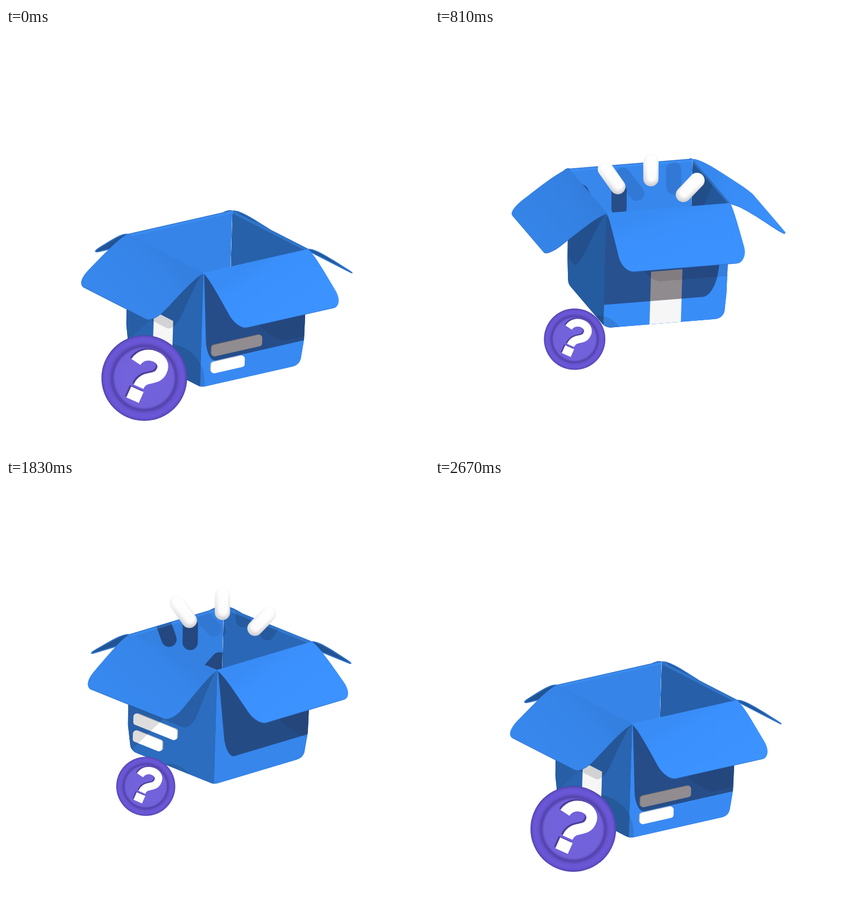
Recreate the animation shown at these times as an HTML page with a canvas. Size 748 by 748 pixels, loop 2700 ms.

```html
<!DOCTYPE html>
<html lang="en">
<head>
<meta charset="utf-8">
<title>Mystery box</title>
<style>
html, body { margin: 0; width: 100%; height: 100%; overflow: hidden; background: #fff; }
canvas { display: block; width: 748px; height: 748px; }
</style>
</head>
<body>
<canvas id="stage" width="748" height="748"></canvas>
<script>
const ctx = document.getElementById('stage').getContext('2d');
const LOOP = 2700, STEP = 30;
const HALF = 114.5, DEPTH = 222, FLAP_HALF = 113, WALL = 8;
const PITCH = 0.35, RISE = 0.937, ROLL = 0.03;
const DEG = Math.PI / 180;
const KEY = { az: 30 * DEG, slope: 0.85, power: 0.45 };
const FILL = { az: -18 * DEG, slope: 0.46, power: 0.13 };

// Monotone cubic through [time, value] pairs, at rest at both ends
function track(keys) {
  const d = keys.slice(1).map((k, i) => (k[1] - keys[i][1]) / (k[0] - keys[i][0]));
  const slope = keys.map((_, i) => {
    const a = d[i - 1], b = d[i];
    return i && i < d.length && a * b > 0 ? 2 * a * b / (a + b) : 0;
  });
  return t => {
    let i = 0;
    while (i < keys.length - 2 && t > keys[i + 1][0]) i++;
    const [t0, a] = keys[i], [t1, b] = keys[i + 1], h = t1 - t0, u = (t - t0) / h, v = 1 - u;
    return a * v * v * (1 + 2 * u) + b * u * u * (3 - 2 * u)
      + h * u * v * (slope[i] * v - slope[i + 1] * u);
  };
}
const spin = track([[0, 0], [570, 32.8], [1080, 129], [1500, 211], [1830, 277], [2070, 316], [2700, 360]]);
const boxY = track([[0, 378.5], [570, 293], [1080, 272], [1300, 270], [1500, 272], [1830, 282],
  [2070, 296], [2175, 334], [2700, 378.5]]);
const capsuleY = track([[0, 450], [570, 290], [1080, 172], [1300, 165], [1500, 166], [1650, 172],
  [1830, 192], [2070, 256], [2190, 300], [2700, 450]]);

let cx, cy;
const project = (x, z, y) => {
  const v = PITCH * z + RISE * y;
  return [cx + x - ROLL * v, cy + v + ROLL * x];
};
// Point on a side: w along it, o out of it, y down from the rim
const onSide = (az, w, o, y) => {
  const s = Math.sin(az), c = Math.cos(az), r = HALF + o;
  return project(c * w + s * r, -s * w + c * r, y);
};

function trace(points) {
  ctx.beginPath();
  points.forEach(p => ctx.lineTo(p[0], p[1]));
  ctx.closePath();
}
function fill(points, style) {
  trace(points);
  ctx.fillStyle = style;
  ctx.fill();
}
const blue = k => `rgb(${58 * k},${143 * k},${Math.min(255, 251 * k)})`;
const shade = a => `rgba(18,8,14,${a})`;
const facing = (az, light) => Math.max(0, Math.cos(az - light.az));
const wallTone = az => 0.44 + KEY.power * facing(az, KEY) + FILL.power * facing(az, FILL)
  + 0.12 * Math.max(0, Math.cos(az + 80 * DEG));
const flapTone = az => 0.95 + 0.07 * Math.cos(az - 50 * DEG);

const bend = s => {
  const r = 1 - s, a = 3 * r * r * s, b = 3 * r * s * s, c = s * s * s;
  return [20 * a + 60 * b + 108 * c, 3 * a + 36 * b + 70 * c];
};
const flapOutline = (() => {
  const half = [];
  for (let i = 0; i <= 12; i++) half.push([-FLAP_HALF, i / 12 * 0.82]);
  for (let i = 1; i <= 8; i++) {
    const a = i / 8 * Math.PI / 2;
    half.push([-FLAP_HALF + 20 * (1 - Math.cos(a)), 0.82 + 0.18 * Math.sin(a)]);
  }
  const all = half.concat(half.slice().reverse().map(([w, s]) => [-w, s]));
  return all.map(([w, s]) => [w * (1 + 0.02 * s), ...bend(s)]);
})();

function drawFlap(az) {
  const pts = flapOutline.map(([w, o, y]) => onSide(az, w, o, y));
  ctx.lineWidth = 2;
  ctx.lineJoin = 'round';
  if (Math.cos(az) < -0.566) {
    fill(pts, blue(0.58));
    ctx.strokeStyle = blue(0.8);
    ctx.stroke();
    return;
  }
  const k = flapTone(az);
  fill(pts.map(([x, y]) => [x, y + 2]), blue(k * 0.8));
  const a = onSide(az, 0, 0, 0), b = onSide(az, 0, 108, 70);
  const g = ctx.createLinearGradient(a[0], a[1], b[0], b[1]);
  g.addColorStop(0, blue(k * 0.96));
  g.addColorStop(0.25, blue(k * 0.99));
  g.addColorStop(1, blue(k * 1.01));
  fill(pts, g);
  ctx.strokeStyle = g;
  ctx.stroke();
}

const rect = (az, w0, w1, y0, y1, o = 0) =>
  [[w0, y0], [w1, y0], [w1, y1], [w0, y1]].map(([w, y]) => onSide(az, w, o, y));

function bar(az, w0, w1, y) {
  const r = 5.5;
  [[0, '#bdbdc2'], [2.5, '#fff']].forEach(([o, color]) => {
    fill(rect(az, w0 + r, w1 - r, y + r, y + 21 - r, o), color);
    ctx.strokeStyle = color;
    ctx.lineWidth = 2 * r;
    ctx.lineJoin = 'round';
    ctx.stroke();
  });
}

function drawWall(az, index) {
  const k = wallTone(az);
  ctx.save();
  trace(rect(az, -HALF, HALF, 0, DEPTH + 12));
  ctx.clip();
  ctx.fillStyle = blue(k);
  ctx.fill();
  if (index === 0) fill(rect(az, -29, 29, 117, DEPTH + 4), '#f6f6f7');
  if (index === 1) {
    bar(az, -92, 16, 140);
    bar(az, -92, -21, 172);
  }
  [KEY, FILL].forEach(light => {
    const delta = az - light.az, c = Math.cos(delta);
    if (c < 0.08) return;
    // The walls lie slightly inside the rim, so rays travel a little further
    const cast = flapOutline.map(([w, o, y]) =>
      onSide(az, w + 1.09 * o * Math.tan(delta), 0, y + light.slope * 1.09 * o / c));
    fill(cast, shade(light.power * c / k));
  });
  ctx.restore();
}

function hull(points) {
  const sorted = points.slice().sort((a, b) => a[0] - b[0] || a[1] - b[1]);
  const half = list => {
    const out = [];
    for (const p of list) {
      while (out.length > 1) {
        const [a, b] = out.slice(-2);
        if ((b[0] - a[0]) * (p[1] - a[1]) - (b[1] - a[1]) * (p[0] - a[0]) > 0) break;
        out.pop();
      }
      out.push(p);
    }
    return out.slice(0, -1);
  };
  return half(sorted).concat(half(sorted.reverse()));
}
function bodyOutline(sides) {
  const pts = [], r = 18;
  sides.forEach(az => {
    pts.push(onSide(az, HALF, 0, 0), onSide(az, HALF - 2, -2, 170));
    const [x, y] = onSide(az, HALF - r, -r, DEPTH - r);
    for (let i = 0; i < 24; i++) {
      const a = i * 15 * DEG;
      pts.push([x + r * Math.cos(a), y + r * Math.sin(a)]);
    }
  });
  return hull(pts);
}

// Screen end points of the three flying capsules
function capsules(top) {
  const dx = -ROLL * (top - 166);
  return [[303, 27, 325, 58], [383.5, 14, 383.5, 44], [465, 47, 441, 72]]
    .map(([x0, y0, x1, y1]) => [[x0 + dx, top + y0], [x1 + dx, top + y1]]);
}
function line([a, b], width, style, dx = 0, dy = 0) {
  ctx.beginPath();
  ctx.moveTo(a[0] + dx, a[1] + dy);
  ctx.lineTo(b[0] + dx, b[1] + dy);
  ctx.lineCap = 'round';
  ctx.lineWidth = width;
  ctx.strokeStyle = style;
  ctx.stroke();
}
function drawCapsule(ends) {
  const g = ctx.createLinearGradient(0, ends[0][1] - 14, 0, ends[1][1] + 14);
  for (let i = 0; i <= 6; i++) {
    const v = 200 + i * 9;
    const layer = i === 6 ? '#fff' : g;
    if (i === 0) {
      g.addColorStop(0, '#fbfbfb');
      g.addColorStop(0.5, '#e9e9ea');
      g.addColorStop(1, '#cdcdd0');
      line(ends, 27, layer);
    } else {
      line(ends, 27 - i * 2.2, `rgba(255,255,255,${(v - 200) / 100})`, i * 0.3, -i * 0.7);
    }
  }
}

function drawInside(az, rods) {
  const tone = wallTone(Math.atan2(-Math.sin(az), -Math.cos(az)));
  ctx.save();
  trace(rect(az, -HALF, HALF, 0, DEPTH));
  ctx.clip();
  ctx.fillStyle = blue(tone * 0.96);
  ctx.fill();
  const n = [Math.sin(az), Math.cos(az)];
  [KEY, FILL].forEach(light => {
    const delta = az - light.az, c = -Math.cos(delta);
    if (c < 0.12) return;
    rods.forEach(rod => {
      const cast = rod.map(([px, py]) => {
        const x = px - cx + ROLL * (py - cy), y = (py - cy - ROLL * x) / RISE;
        const s = (HALF - WALL - n[0] * x) / c;
        return onSide(az, n[1] * x + s * Math.sin(delta), -WALL, y + light.slope * s);
      });
      line(cast, 27, shade(light.power * c / tone));
    });
  });
  line([onSide(az, -HALF, 0, 2), onSide(az, HALF, 0, 2)], 5, 'rgba(70,155,255,.35)');
  ctx.restore();
}

function drawMark(color, dx, dy) {
  ctx.save();
  ctx.translate(dx, dy);
  ctx.rotate(24 * DEG);
  ctx.strokeStyle = ctx.fillStyle = color;
  ctx.lineWidth = 19;
  ctx.lineCap = 'butt';
  ctx.beginPath();
  ctx.moveTo(-25, -20);
  ctx.bezierCurveTo(-20, -50, 25, -49, 23, -23);
  ctx.bezierCurveTo(22, -2, -3, -7, -3, 18);
  ctx.stroke();
  ctx.fillRect(-15, 23, 24, 21);
  ctx.restore();
}
function drawCoin(x, y, r) {
  ctx.save();
  ctx.translate(x, y);
  ctx.scale(r / 75.5, r / 75.5);
  const g = ctx.createRadialGradient(0, 0, 0, 0, 0, 75.5);
  [[0, '#7362dc'], [0.67, '#7162da'], [0.7, '#6a5ad0'], [0.735, '#5443ac'], [0.77, '#5847b4'],
    [0.82, '#6754d0'], [0.9, '#6b58d8'], [0.96, '#6150ca'], [1, '#5040a8']]
    .forEach(([at, color]) => g.addColorStop(at, color));
  ctx.fillStyle = g;
  ctx.beginPath();
  ctx.arc(0, 0, 75.5, 0, 7);
  ctx.fill();
  drawMark('#4d3d9a', -2.5, -2.5);
  drawMark('#fff', 0, 0);
  ctx.restore();
}

function draw(t) {
  ctx.fillStyle = '#fff';
  ctx.fillRect(0, 0, 748, 748);
  cy = boxY(t);
  cx = 380 - 0.05 * (cy - 272);
  const lift = (1 - Math.cos(2 * Math.PI * t / LOOP)) / 2;
  const coin = { x: 244.5 + 3.7 * lift, y: 619 - 105 * lift, r: 75.8 - 32.8 * lift };
  const sides = [0, 1, 2, 3].map(i => (-53.5 + 90 * i + spin(t)) * DEG);
  const byDepth = sides.slice().sort((a, b) => Math.cos(a) - Math.cos(b));
  const back = byDepth.filter(az => Math.cos(az) < 0);
  const front = byDepth.filter(az => Math.cos(az) >= 0);
  const rods = capsules(capsuleY(t));

  back.forEach(drawFlap);
  ctx.save();
  trace(sides.map(az => onSide(az, HALF, 0, 0)));
  ctx.clip();
  back.forEach(az => drawInside(az, rods));
  ctx.restore();
  rods.forEach(drawCapsule);

  // Underlay in the mean wall tone, limited to the part below the front rim
  const left = onSide(front[0], -HALF, 0, 0), right = onSide(front[0], HALF, 0, 0);
  const corners = front.flatMap(az => [onSide(az, -HALF, 0, 0), onSide(az, HALF, 0, 0)])
    .concat([left, right]).sort((a, b) => a[0] - b[0]);
  ctx.save();
  trace(bodyOutline(sides));
  ctx.clip();
  trace([...corners, [748, 748], [0, 748]]);
  ctx.fillStyle = blue(front.reduce((sum, az) => sum + wallTone(az), 0) / front.length * 0.85);
  ctx.fill();
  front.forEach(az => drawWall(az, sides.indexOf(az)));
  ctx.beginPath();
  ctx.rect(0, cy + 100, 748, 300);
  ctx.clip();
  ctx.beginPath();
  ctx.arc(coin.x + 40, coin.y + 6, coin.r * 0.88, 0, 7);
  ctx.fillStyle = shade(0.13);
  ctx.fill();
  ctx.restore();

  front.forEach(drawFlap);
  drawCoin(coin.x, coin.y, coin.r);
}

let start;
function frame(now) {
  if (start === undefined) start = now;
  draw(Math.floor((now - start) % LOOP / STEP) * STEP);
  requestAnimationFrame(frame);
}
draw(0);
requestAnimationFrame(frame);
</script>
</body>
</html>
```
